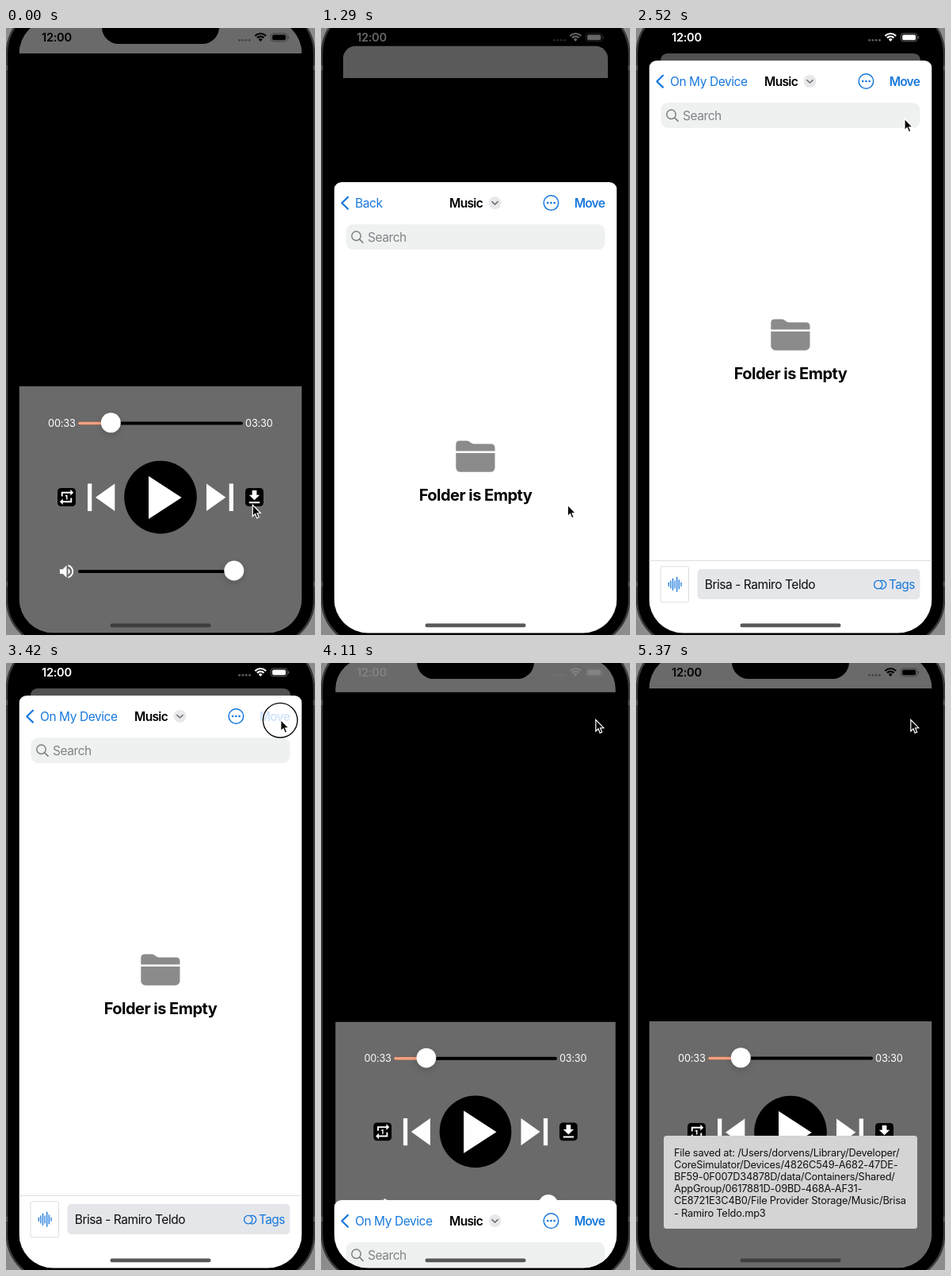
An HTML page with a canvas that plays this animation: 390x764 px, repeating every 5640 ms.

```html
<!DOCTYPE html>
<html lang="en">
<head>
<meta charset="utf-8">
<title>Saving a track to a folder</title>
<style>
  html, body { margin: 0; width: 100%; height: 100%; overflow: hidden; background: #777; }
  canvas { display: block; width: 390px; height: 764px; }
</style>
</head>
<body>
<canvas id="stage"></canvas>
<script>
const W = 390, H = 764, LOOP = 5640, TICK = 30;
const BLUE = '#1778dc', GREY = '#6a6a6a';
const SCREEN = { x: 16.5, y: -11, w: 357, h: 772.5, r: 43 };
const SHEET_TOP = 41, SHEET_OUT = 764;
const OPEN_AT = 1153, CLOSE_AT = 3939, SPRING = 0.0213;
const LOADED_AT = 1260, TITLED_AT = 1620;

const canvas = document.getElementById('stage');
const g = canvas.getContext('2d');
const dpr = window.devicePixelRatio || 1;
canvas.width = W * dpr;
canvas.height = H * dpr;

const ICONS = {
  repeat: new Path2D('M7 7h10v3l4-4-4-4v3H5v6h2V7zm10 10H7v-3l-4 4 4 4v-3h12v-6h-2v4zm-4-2V9h-1l-2 1v1h1.5v4H13z'),
  save: new Path2D('M19 9h-4V3H9v6H5l7 7 7-7zM5 18v2h14v-2H5z'),
  volume: new Path2D('M3 9v6h4l5 5V4L7 9H3zm13.5 3c0-1.77-1.02-3.29-2.5-4.03v8.05c1.48-.73 2.5-2.25 2.5-4.02zM14 3.23v2.06c2.89.86 5 3.54 5 6.71s-2.11 5.85-5 6.71v2.06c4.01-.91 7-4.49 7-8.77s-2.99-7.86-7-8.77z')
};

const TOAST = [
  'File saved at: /Users/dorvens/Library/Developer/',
  'CoreSimulator/Devices/4826C549-A682-47DE-',
  'BF59-0F007D34878D/data/Containers/Shared/',
  'AppGroup/0617881D-09BD-468A-AF31-',
  'CE8721E3C4B0/File Provider Storage/Music/Brisa',
  '- Ramiro Teldo.mp3'
];

const clamp = v => Math.max(0, Math.min(1, v));
const lerp = (a, b, k) => a + (b - a) * k;
const ramp = (t, a, b) => clamp((t - a) / (b - a));
const smooth = k => k * k * (3 - 2 * k);

function spring(ms) {
  const x = Math.max(0, ms) * SPRING;
  return 1 - (1 + x) * Math.exp(-x);
}

// Alpha of a pressed control: fades down, holds, fades back.
const pressed = (t, a, down, up, b) => 1 - 0.8 * (ramp(t, a, down) - ramp(t, up, b));

function rect(x, y, w, h, r, fill, stroke, lw = 1) {
  g.beginPath();
  g.roundRect(x, y, w, h, r);
  paint(fill, stroke, lw);
}

function circle(x, y, r, fill, stroke, lw = 1) {
  g.beginPath();
  g.arc(x, y, r, 0, Math.PI * 2);
  paint(fill, stroke, lw);
}

function paint(fill, stroke, lw) {
  if (fill) { g.fillStyle = fill; g.fill(); }
  if (stroke) { g.strokeStyle = stroke; g.lineWidth = lw; g.stroke(); }
}

function trace(points) {
  g.beginPath();
  points.forEach(([x, y]) => g.lineTo(x, y));
}

function polygon(points, fill) {
  trace(points);
  g.closePath();
  paint(fill);
}

function line(points, color, lw) {
  g.lineCap = g.lineJoin = 'round';
  trace(points);
  paint(null, color, lw);
}

function text(s, x, y, size, color, weight = 400, track = -0.028) {
  g.font = `${weight} ${size}px Inter, "Liberation Sans", sans-serif`;
  g.letterSpacing = `${track * size}px`;
  g.fillStyle = color;
  g.fillText(s, x, y);
}

function icon(path, x, y) {
  g.save();
  g.translate(x, y);
  g.scale(0.96, 0.96);
  g.fillStyle = '#fff';
  g.fill(path);
  g.restore();
}

function thumb(x, y) {
  g.save();
  g.shadowColor = 'rgba(0,0,0,.16)';
  g.shadowBlur = 8 * dpr;
  g.shadowOffsetY = 3 * dpr;
  circle(x, y, 12.5, '#fff');
  g.restore();
}

function drawPlayer(t, p) {
  const s = 1 - 0.081 * p;
  g.save();
  g.translate(195, 375 + 11.7 * p);
  g.scale(s, s);
  g.translate(-195, -375);
  g.beginPath();
  g.roundRect(SCREEN.x, SCREEN.y, SCREEN.w, SCREEN.h, lerp(SCREEN.r, 9.5, p));
  g.clip();
  rect(16, -12, 358, 44, 0, GREY);
  rect(16, 451, 358, 312, 0, GREY);

  text('00:33', 53, 502.3, 12.8, '#fff', 400, -0.015);
  text('03:30', 302, 502.3, 12.8, '#fff', 400, -0.015);
  rect(91, 495.5, 208, 4, 2, '#000');
  rect(91, 495.5, 42, 4, 2, '#f5a283');
  thumb(132.3, 496.8);

  rect(65, 579, 23, 23, 4.5, '#000');
  icon(ICONS.repeat, 65, 579);
  rect(103, 573.5, 5.3, 34.5, 0, '#fff');
  polygon([[137.3, 573.5], [137.3, 608], [113, 590.7]], '#fff');
  circle(195, 590.6, 45.8, '#000');
  polygon([[180, 564], [180, 618], [221.7, 591]], '#fff');
  polygon([[253, 573.5], [253, 608], [277.3, 590.7]], '#fff');
  rect(281.7, 573.5, 5.3, 34.5, 0, '#fff');

  g.globalAlpha = pressed(t, 390, 540, 570, 720);
  rect(302, 579, 23, 23, 4.5, '#000');
  icon(ICONS.save, 302, 579);
  g.globalAlpha = 1;

  icon(ICONS.volume, 65, 672.5);
  rect(91, 682, 208, 4, 2, '#000');
  thumb(287.8, 683);

  rect(16, -12, 358, 775, 0, `rgba(0,0,0,${0.24 * p * p})`);
  g.restore();
}

function drawSheet(t, top) {
  g.save();
  g.translate(0, top - SHEET_TOP);
  rect(16.5, 41, 357, 800, 9.5, '#fff');
  if (t >= LOADED_AT) drawFolder(t);
  g.restore();
}

function drawFolder(t) {
  line([[34, 59.8], [26.3, 67.2], [34, 74.6]], BLUE, 2.2);
  text(t < TITLED_AT ? 'Back' : 'On My Device', 43, 72.6, 15.5, BLUE);
  text('Music', 162, 72.6, 15.5, '#000', 600, -0.042);
  circle(219.5, 67, 8, '#e8e8ea');
  line([[215.9, 65.6], [219.5, 69], [223.1, 65.6]], '#727276', 1.6);
  circle(290.4, 67, 9.3, null, BLUE, 1.5);
  for (const d of [-4.2, 0, 4.2]) circle(290.4 + d, 67, 1.35, BLUE);
  g.globalAlpha = pressed(t, 3270, 3300, 3570, 3810);
  text('Move', 319.7, 72.6, 15.5, BLUE, 600, -0.05);
  g.globalAlpha = 1;

  rect(31.5, 94, 327, 32, 9, '#eff1f1');
  circle(44.5, 108.7, 5.7, null, '#7d7d81', 1.5);
  line([[48.8, 113], [53, 117.2]], '#7d7d81', 1.7);
  text('Search', 59, 115.6, 15.5, '#828286');

  g.beginPath();
  g.moveTo(170.3, 379.5);
  g.lineTo(170.3, 371);
  g.quadraticCurveTo(170.3, 366.5, 175, 366.5);
  g.lineTo(184, 366.5);
  g.quadraticCurveTo(186.5, 366.5, 188.5, 368.4);
  g.quadraticCurveTo(190.5, 370.4, 193, 370.4);
  g.lineTo(214.5, 370.4);
  g.quadraticCurveTo(219.5, 370.4, 219.5, 375.5);
  g.lineTo(219.5, 379.5);
  paint('#8b8b8b');
  rect(170.3, 382, 49.2, 23.7, [0, 0, 5.5, 5.5], '#8b8b8b');
  g.textAlign = 'center';
  text('Folder is Empty', 195, 442, 20, '#000', 700, -0.026);
  g.textAlign = 'left';

  rect(16.5, 670, 357, 1, 0, '#dedede');
  rect(31, 677.8, 35.5, 45, 2, '#fff', '#dcdcde', 1);
  [4, 9, 14, 9, 18, 11, 4].forEach((h, i) => {
    const x = 41.3 + i * 2.6;
    line([[x, 700.3 - h / 2], [x, 700.3 + h / 2]], BLUE, 1.3);
  });
  rect(77.5, 681, 281, 38, 5, '#e5e6ea');
  text('Brisa - Ramiro Teldo', 86.7, 706, 15.5, '#0c0c0c');
  circle(305.7, 700.6, 5.2, null, BLUE, 1.3);
  g.beginPath();
  g.arc(310.5, 700.6, 5.2, -1.9, 1.9);
  paint(null, BLUE, 1.3);
  text('Tags', 319, 706, 15.5, BLUE, 400, -0.04);
}

function drawStatus(white) {
  const v = Math.round(255 * white);
  const c = `rgb(${v},${v},${v})`;
  const faint = `rgba(${v},${v},${v},.38)`;
  text('12:00', 45, 17, 14.6, c, 600, -0.02);
  for (let i = 0; i < 4; i++) circle(294.6 + i * 4.3, 15.3, 1.4, faint);
  g.lineCap = 'butt';
  for (const r of [9.4, 5.8]) {
    g.beginPath();
    g.arc(321.2, 16.4, r, -Math.PI * 0.76, -Math.PI * 0.24);
    paint(null, c, 2.2);
  }
  g.beginPath();
  g.moveTo(321.2, 17);
  g.arc(321.2, 16.4, 3.1, -Math.PI * 0.78, -Math.PI * 0.22);
  paint(c);
  rect(334.4, 6.9, 20.4, 9.9, 3, null, faint, 1);
  rect(336.1, 8.5, 17, 6.7, 1.7, c);
  rect(355.9, 10.2, 1.3, 3.4, 0.7, faint);
}

function drawToast(alpha) {
  g.globalAlpha = alpha;
  rect(35, 595, 320, 117, 3.5, '#d4d4d4');
  TOAST.forEach((s, i) => text(s, 48, 620.6 + i * 15.22, 12.8, '#111', 400, -0.015));
  g.globalAlpha = 1;
}

function drawBody() {
  rect(0, 0, W, H, 0, '#8c8c8c');
  rect(1, -27, 388, 805, 59, '#000', '#3a3a3a', 2.5);
  for (const y of [47, 697]) {
    rect(0, y, 2.2, 6, 0, '#555');
    rect(387.8, y, 2.2, 6, 0, '#555');
  }
}

// Pointer stops: time, x, y.
const STOPS = [[1770, 311.3, 600.3], [2310, 340, 128], [2520, 339, 114.3], [2790, 346.8, 71.5]];

function pointerAt(t) {
  let [, x, y] = STOPS[0];
  for (let i = 1; i < STOPS.length; i++) {
    const [a, ax, ay] = STOPS[i - 1], [b, bx, by] = STOPS[i];
    if (t < a) break;
    const k = smooth(ramp(t, a, b));
    x = lerp(ax, bx, k);
    y = lerp(ay, by, k);
  }
  return [x, y];
}

function drawPointer(t) {
  const [x, y] = pointerAt(t);
  const held = (t >= 390 && t < 600) || (t >= 3300 && t < 3570);
  if (held) circle(x - 0.7, y + 0.6, 21.7, null, '#0a0a0a', 1.4);
  g.save();
  g.translate(x, y);
  g.lineJoin = 'miter';
  trace([[0, 0], [0, 14.3], [3.2, 11.3], [5.4, 16.6], [7.9, 15.5], [5.7, 10.4], [10, 10.2]]);
  g.closePath();
  paint('#000', '#fff', 1.2);
  g.restore();
}

function draw(t) {
  const p = t < CLOSE_AT ? spring(t - OPEN_AT) : 1 - spring(t - CLOSE_AT);
  const white = t < CLOSE_AT ? ramp(t, 1170, 1470) : 1 - ramp(t, CLOSE_AT, 4290);
  g.setTransform(dpr, 0, 0, dpr, 0, 0);
  drawBody();

  g.save();
  g.beginPath();
  g.roundRect(SCREEN.x, SCREEN.y, SCREEN.w, SCREEN.h, SCREEN.r);
  g.clip();
  drawPlayer(t, p);
  if (p > 0.0005) drawSheet(t, lerp(SHEET_OUT, SHEET_TOP, p));
  if (t > 4170) drawToast(ramp(t, 4170, 4380));
  drawStatus(white);
  rect(121, -30, 148, 50, 21, '#000');
  const bar = Math.round(lerp(62, 88, clamp(p * 12)));
  rect(131.5, 749.6, 127, 4.6, 2.3, `rgb(${bar},${bar},${bar})`);
  g.restore();

  drawPointer(t);
}

const start = performance.now();
function frame() {
  const t = (performance.now() - start) % LOOP;
  draw(Math.floor(t / TICK) * TICK);
  requestAnimationFrame(frame);
}
frame();
</script>
</body>
</html>
```
